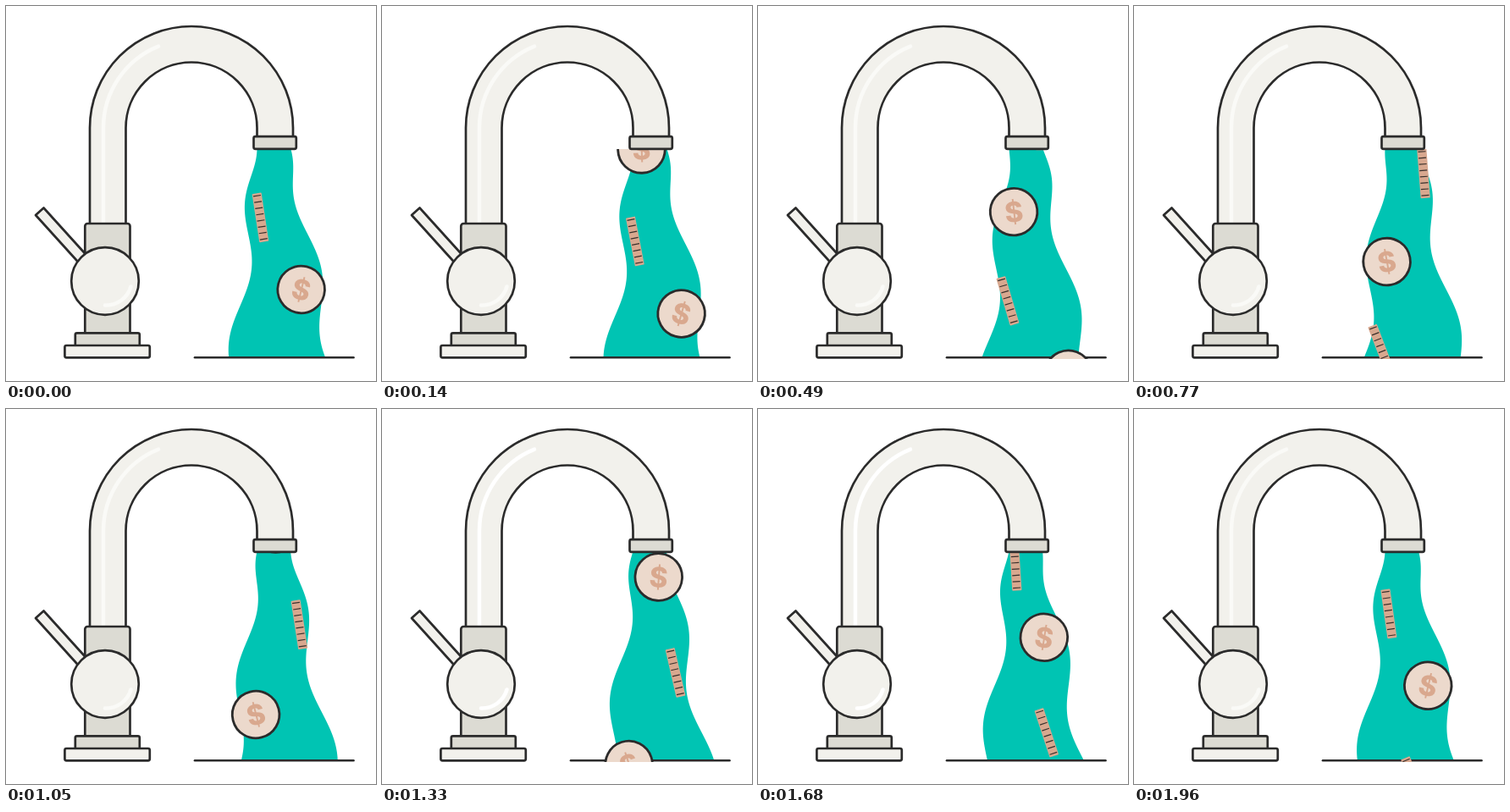
An HTML page that plays this animation: 437x443 px, repeating every 2030 ms.

```html
<!DOCTYPE html>
<html lang="en">
<head>
<meta charset="utf-8">
<title>Money tap</title>
<style>
  html, body { margin: 0; width: 100%; height: 100%; overflow: hidden; background: #fff; }
  svg { display: block; width: 100vw; height: 100vh; }
  .metal, .shade { stroke: #2b2b2b; stroke-width: 2.7; stroke-linejoin: round; }
  .metal { fill: #f2f1ec; }
  .shade { fill: #dcdbd3; }
  .shine { fill: none; stroke: #fafaf7; stroke-width: 4.5; stroke-linecap: round; animation: shine 2030ms step-end infinite; }
  .coin circle { fill: #ecd9cc; stroke: #2b2b2b; stroke-width: 2.8; }
  .coin text { font: 800 33px Inter, "Liberation Sans", sans-serif; fill: #d9a88e; text-anchor: middle; }
  .bill rect { fill: #d8a88f; }
  .bill path { stroke: #3a302c; stroke-width: 1.2; }
  @keyframes shine {
    0%, 86.2% { stroke: #fafaf7; }
    58.62% { stroke: #fff; }
  }
</style>
</head>
<body>
<svg viewBox="0 0 437 443">
  <defs>
    <clipPath id="fall"><rect x="200" y="169" width="237" height="248"/></clipPath>
    <g id="coin" class="coin">
      <circle r="27.8"/>
      <text y="12">$</text>
    </g>
    <g id="bill" class="bill">
      <rect x="-5.6" y="-29" width="11.2" height="58" rx="1"/>
      <path d="M-4.5-26h9m-9 7.4h9m-9 7.4h9m-9 7.4h9m-9 7.4h9m-9 7.4h9m-9 7.4h9m-9 7.4h9"/>
    </g>
  </defs>

  <path id="stream" fill="#00c4b3"/>
  <path d="M223 415.3H410.5" stroke="#2b2b2b" stroke-width="2.6" stroke-linecap="round"/>
  <g id="items" clip-path="url(#fall)"></g>

  <path class="metal" d="M99 260V144A120 120 0 0 1 339 144V157H296.5V144A77.5 77.5 0 0 0 141.5 144V260Z"/>
  <path class="shine" d="M115 257V144A104 104 0 0 1 180 47.6"/>
  <rect class="shade" x="292.5" y="154.2" width="50.3" height="14.6" rx="2"/>

  <path class="metal" d="M35 247L44.5 238.5L111 312L101.5 320.5Z"/>
  <rect class="shade" x="93.3" y="257" width="53.2" height="131" rx="3"/>
  <rect class="shade" x="81.8" y="386.3" width="76" height="16" rx="2"/>
  <rect class="metal" x="69.4" y="401" width="100.4" height="14.3" rx="2"/>
  <circle class="metal" cx="117" cy="325" r="39.8"/>
  <path class="shine" d="M147.5 331.5A30.5 30.5 0 0 1 117 353.5"/>
</svg>
<script>
  const LOOP = 2030, STEP = 70, CYCLE = 2000;
  const TOP = 168, BOTTOM = 415, WAVE = 172;

  // x = x + vx*age + ax*age², y = y + vy*age, tilt = turn*age (age in ms)
  const items = [
    { kind: "bill", start: 1450, x: 306.6, vx: -0.0112, ax: 0, y: 139.3, vy: 0.201, turn: -0.0158 },
    { kind: "bill", start: 480, x: 333, vx: 0.0389, ax: -2.7e-5, y: 139.3, vy: 0.2025, turn: -0.0152 },
    { kind: "coin", start: 1050, x: 318.5, vx: 0.0285, ax: 3.4e-6, y: 141.5, vy: 0.2036, turn: 0.0145 },
    { kind: "coin", start: 0, x: 308.2, vx: -0.0125, ax: 0, y: 140, vy: 0.2105, turn: -0.0135 }
  ];

  const stream = document.getElementById("stream");
  const layer = document.getElementById("items");
  for (const item of items) {
    item.node = document.createElementNS("http://www.w3.org/2000/svg", "use");
    item.node.setAttribute("href", "#" + item.kind);
    layer.append(item.node);
  }

  // Both sides share one wave travelling down a widening column.
  function edge(x, slope, t) {
    const crest = 225 + WAVE * t / CYCLE;
    const points = [];
    for (let y = TOP; y <= BOTTOM; y += 3) {
      const swing = 8.8 * Math.tanh((y - TOP) / 45);
      const sway = swing * Math.cos(2 * Math.PI * (y - crest) / WAVE);
      points.push((x + slope * (y - 170) - sway).toFixed(2) + " " + y);
    }
    return points;
  }

  function draw(t) {
    const left = edge(296.3, -0.107, t);
    const right = edge(336.5, 0.194, t).reverse();
    stream.setAttribute("d", "M" + left.concat(right).join("L") + "Z");
    for (const p of items) {
      const age = (t - p.start + CYCLE) % CYCLE;
      const x = p.x + p.vx * age + p.ax * age * age;
      const y = p.y + p.vy * age;
      p.node.setAttribute("transform", `translate(${x} ${y}) rotate(${p.turn * age})`);
    }
  }

  function tick() {
    const now = performance.now() % LOOP;
    draw(Math.floor(now / STEP) * STEP);
    requestAnimationFrame(tick);
  }
  tick();
</script>
</body>
</html>
```
